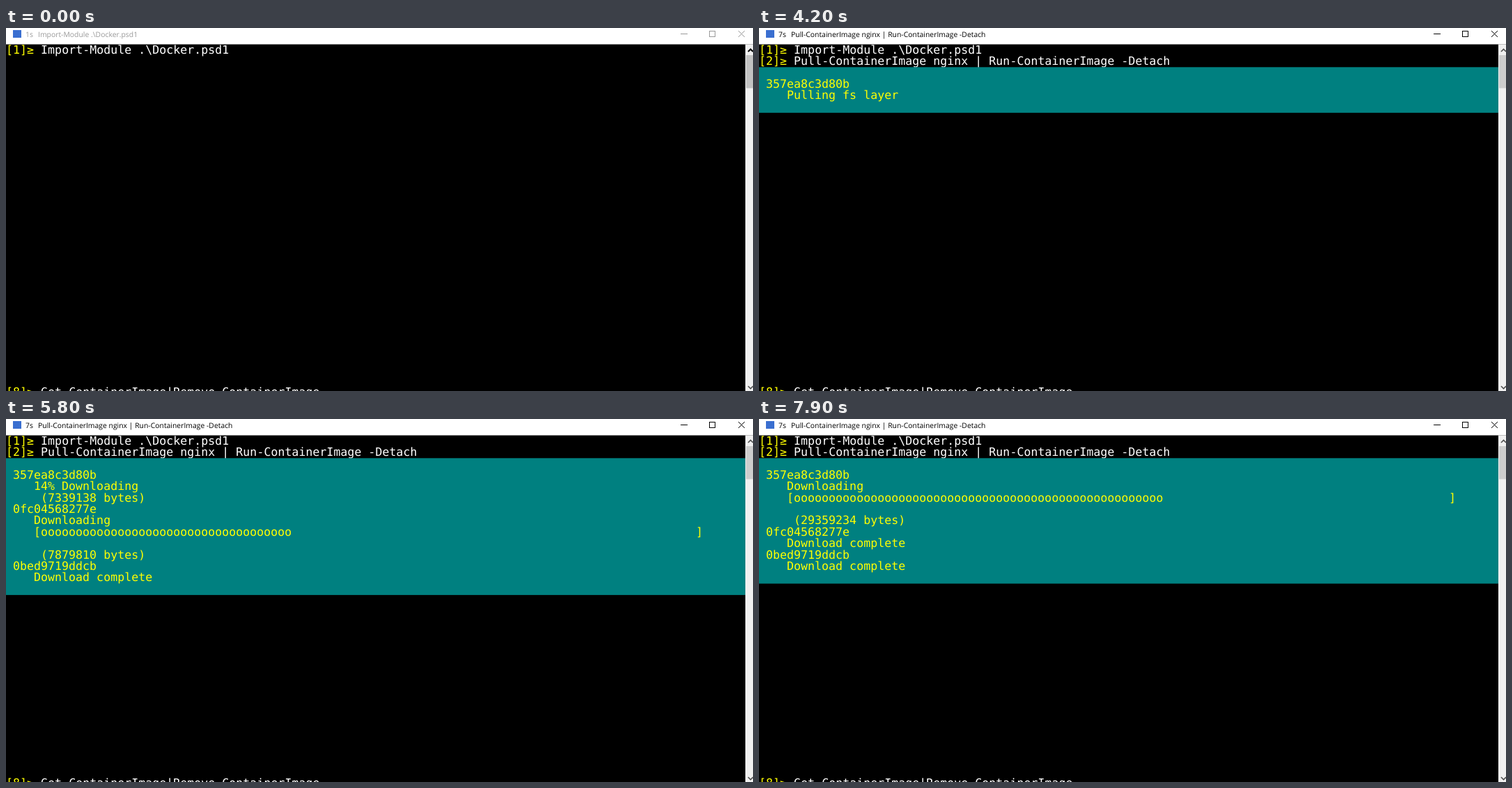
Recreate the animation shown at these times as an HTML page with a canvas. Size 1073 px wide and 522 px high, loop 8 s.

```html
<!DOCTYPE html>
<html lang="en">
<head>
<meta charset="utf-8">
<title>Terminal</title>
<style>
  html, body { margin: 0; width: 100%; height: 100%; overflow: hidden; background: #000; }
  canvas { display: block; }
</style>
</head>
<body>
<canvas id="stage" width="1073" height="522"></canvas>
<script>
const ctx = document.getElementById("stage").getContext("2d");
ctx.textRendering = "geometricPrecision";

const LOOP = 8000, STEP = 100;
const CELL = 10.02, ROW = 16.4, TOP = 23.5;
const MONO = '16.64px "DejaVu Sans Mono", monospace';
const UI = '10.4px "Open Sans", sans-serif';
const YELLOW = "#ff0", WHITE = "#fff";
const COMMANDS = ["Import-Module .\\Docker.psd1",
                  "Pull-ContainerImage nginx | Run-ContainerImage -Detach"];
// Blinks of the underline cursor: [from, to, column, row]
const BLINKS = [[800, 1000, 34, 0], [1800, 2300, 0, 1], [3200, 3400, 61, 1]];

// Each layer reports in fixed chunks; points are [time, chunks received].
const FIRST = { id: "357ea8c3d80b", chunk: 524288, size: 51.37e6,
                points: [[4900, 1], [5800, 14], [6700, 28], [7200, 36], [7900, 56]] };
const SECOND = { id: "0fc04568277e", chunk: 212992, size: 20.1e6,
                 points: [[4700, 1], [5800, 37], [6700, 71], [7200, 89], [7400, 96.2]] };

function rect(x, y, w, h, color) {
  ctx.fillStyle = color;
  ctx.fillRect(x, y, w, h);
}

function line(color, width, ...points) {
  ctx.strokeStyle = color;
  ctx.lineWidth = width;
  ctx.beginPath();
  points.forEach(([x, y]) => ctx.lineTo(x, y));
  ctx.stroke();
}

function print(text, col, row, color = YELLOW) {
  ctx.font = MONO;
  ctx.fillStyle = color;
  ctx.fillText(text, col * CELL, TOP + row * ROW + 13.1);
}

function prompt(number, command, row) {
  print(`[${number}]≥`, 0, row);
  print(command, 5, row, WHITE);
}

function sample(points, t) {
  let i = 1;
  while (i < points.length - 1 && t > points[i][0]) i++;
  const [t0, a] = points[i - 1], [t1, b] = points[i];
  return a + (b - a) * (t - t0) / (t1 - t0);
}

const pending = id => [" " + id, "    Pulling fs layer"];
const complete = id => [" " + id, "    Download complete"];

function layerLines({ id, chunk, size, points }, t, full) {
  if (t < points[0][0]) return pending(id);
  const bytes = Math.floor(sample(points, t) + 1e-6) * chunk - 894;
  if (bytes >= size) return complete(id);
  const percent = Math.floor(bytes / size * 100);
  const total = `     (${bytes} bytes)`;
  if (!full) return [" " + id, `    ${percent}% Downloading`, total];
  const bar = "o".repeat(Math.floor(percent * 0.94)).padEnd(94);
  return [" " + id, "    Downloading", `    [${bar}]`, "", total];
}

function drawProgress(t) {
  if (t < 4200) return;
  let lines = pending(FIRST.id);
  if (t >= 4300) {
    // The layer heard from last gets the full bar.
    const firstFull = t >= 7400 || t >= 4900 && [2, 4].includes(t / STEP % 5);
    const third = t < 5000 ? pending : complete;
    lines = [...layerLines(FIRST, t, firstFull),
             ...layerLines(SECOND, t, !firstFull),
             ...third("0bed9719ddcb")];
  }
  const top = TOP + 2 * ROW;
  rect(0, top, 1062, (lines.length + 2) * ROW, "#008080");
  lines.forEach((text, i) => print(text, 0, i + 3));
}

function drawFrame(t, focus) {
  const shade = Math.round(153 * (1 - focus));
  const ink = `rgb(${shade},${shade},${shade})`;
  rect(0, 0, 1073, 23.5, WHITE);
  rect(10, 3, 12, 11, "#3a6fd0");

  ctx.font = UI;
  ctx.fillStyle = ink;
  ctx.fillText(t < 2600 ? "1s" : "7s", 28, 13);
  ctx.fillText(COMMANDS[t < 2600 ? 0 : 1], 46, 13);

  line(ink, 1, [969, 8.5], [979, 8.5]);
  ctx.strokeRect(1010.5, 4.5, 8, 8);
  line(ink, 1, [1052, 4], [1061, 13]);
  line(ink, 1, [1061, 4], [1052, 13]);
}

function drawScrollbar(focus) {
  const tone = Math.round(80 * focus);
  rect(1062, 23.5, 11, 499, "#f0f0f0");
  rect(1063, 39, 10, 47.5, focus < 1 ? "#c2c2c2" : "#cdcdcd");
  line(`rgb(${tone},${tone},${tone})`, 2 - 0.4 * focus, [1066, 34], [1069.5, 30.5], [1073, 34]);
  line("#505050", 1.6, [1066, 515], [1069.5, 518.5], [1073, 515]);
}

function draw(t) {
  const focus = Math.min(1, Math.max(0, (t - 100) / 400));
  rect(0, 0, 1073, 522, "#000");
  prompt(1, COMMANDS[0], 0);
  if (t >= 2600) prompt(2, COMMANDS[1], 1);
  prompt(8, "Get-ContainerImage|Remove-ContainerImage", 30);
  for (const [from, to, col, row] of BLINKS)
    if (t >= from && t < to) rect(col * CELL, TOP + (row + 1) * ROW - 4, CELL, 4, WHITE);
  drawProgress(t);
  drawScrollbar(focus);
  drawFrame(t, focus);
}

const start = performance.now();
function tick() {
  const t = (performance.now() - start) % LOOP;
  draw(Math.floor(t / STEP) * STEP);
  requestAnimationFrame(tick);
}
tick();
</script>
</body>
</html>
```
